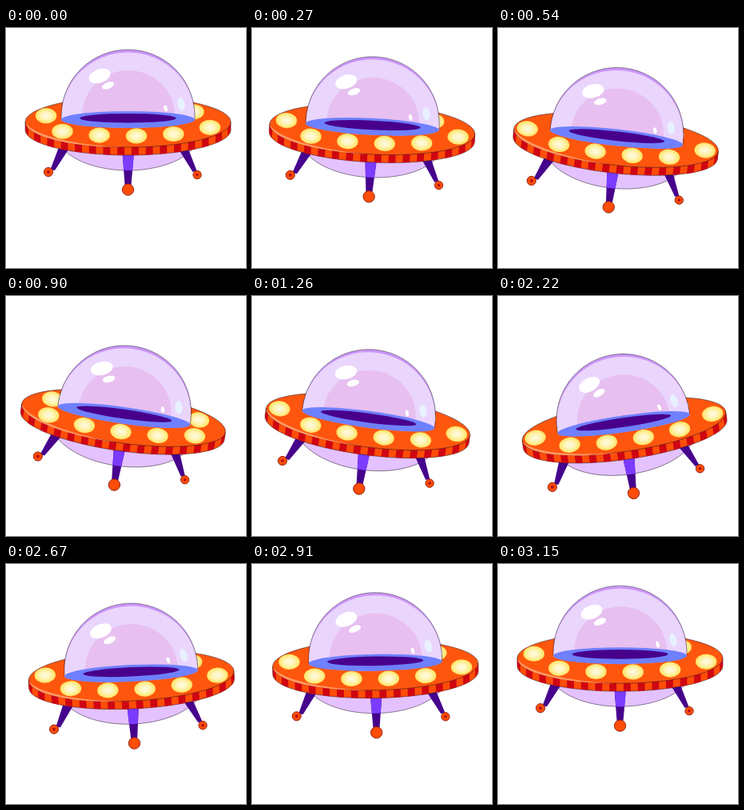
An HTML page for the animation above (3.18 s loop, 300x300 px).

```html
<!DOCTYPE html>
<html lang="en">
<head>
<meta charset="utf-8">
<title>Flying saucer</title>
<style>
  html, body { margin: 0; width: 100%; height: 100%; overflow: hidden; background: #fff; }
  svg { display: block; width: 100vw; height: 100vh; }
  .edge { stroke: #1c1024; stroke-width: .7; stroke-opacity: .7; }
  .foot { fill: #ff4d08; stroke: #8a1c10; stroke-width: .9; }
  .leg { fill: #46038c; }
</style>
</head>
<body>
<svg viewBox="0 0 300 300">
  <defs>
    <radialGradient id="glow">
      <stop offset="0" stop-color="#fffbe6"/>
      <stop offset=".55" stop-color="#fff3b0"/>
      <stop offset="1" stop-color="#ffe25e"/>
    </radialGradient>
    <clipPath id="domeClip"><path d="M69 114V110.5A83.5 83.5 0 0 1 236 110.5V114A83.5 10.5 0 0 1 69 114Z"/></clipPath>
    <path id="track" d="M152.5 135A112 18 0 0 0 264.5 117A112 18 0 0 0 40.5 117A112 18 0 0 0 152.5 135"/>
    <path id="rim" d="M24 117.5A128.5 31.5 0 0 0 281 117.5"/>
  </defs>

  <g id="ship">
    <ellipse class="edge" cx="152.5" cy="132" rx="89" ry="46" fill="#e4c2ff"/>

    <path class="leg" d="M66 149L78 152L61 178L55.5 177Z"/>
    <path class="leg" d="M216 152L227 149L238.5 178.5L233.5 180Z"/>
    <path class="leg" d="M145.5 156H160L156.5 196H148.5Z"/>
    <path fill="#7b3cff" d="M145.5 156H160L158 178H147.3Z"/>
    <circle class="foot" cx="53" cy="180" r="5.6"/>
    <circle class="foot" cx="239" cy="183.5" r="5.2"/>
    <circle class="foot" cx="152.5" cy="202" r="7.2"/>
    <circle cx="53" cy="180" r="2" fill="#b80f1c"/>
    <circle cx="239" cy="183.5" r="1.8" fill="#b80f1c"/>

    <path class="edge" fill="#ff4d08" d="M24 117.5V127.5A128.5 31.5 0 0 0 281 127.5V117.5Z"/>
    <path id="stripes" fill="#cf0612"/>
    <ellipse class="edge" cx="152.5" cy="117.5" rx="128.5" ry="31.5" fill="#ff560e"/>
    <path fill="#ff9a66" d="M24.5 119C28 136 82 149 146 149C90 147 36 135 24.5 119Z"/>
    <g id="lights" fill="url(#glow)"></g>

    <g clip-path="url(#domeClip)">
      <path fill="#cc96fb" d="M69 126V110.5A83.5 83.5 0 0 1 236 110.5V126Z"/>
      <ellipse cx="152.5" cy="112" rx="83.5" ry="81.5" fill="#ead5fd"/>
      <ellipse cx="153" cy="110" rx="58" ry="57" fill="#e7bff0"/>
    </g>
    <path class="edge" fill="none" d="M69 114V110.5A83.5 83.5 0 0 1 236 110.5V114"/>
    <ellipse cx="152.5" cy="114.5" rx="83.5" ry="10.5" fill="#6f80ff"/>
    <ellipse cx="152.5" cy="112.7" rx="60" ry="5.8" fill="#48008c"/>

    <g fill="#fff">
      <ellipse rx="14" ry="8.5" transform="translate(117 60) rotate(-20)"/>
      <ellipse rx="8" ry="4" transform="translate(127.5 72) rotate(-22)"/>
      <ellipse rx="2.1" ry="4" transform="translate(199.5 100.5) rotate(-15)"/>
      <ellipse rx="4.5" ry="8.3" transform="translate(219 95) rotate(-12)" fill="#e8f1ff"/>
    </g>
  </g>
</svg>

<script>
  const STEP = 30, STEPS = 106, LIGHTS = 10, STEPS_PER_GAP = 8;
  const byId = id => document.getElementById(id);
  const ship = byId('ship'), track = byId('track'), rim = byId('rim');

  // time, x shift, y shift, tilt in degrees
  const poses = [
    [0, 0, 0, 0],
    [540, -4.8, 22.4, 6.4],
    [1080, -5.9, 38.5, 8.2],
    [1260, -7.5, 39.7, 7.6],
    [1530, -8.6, 43.2, 1],
    [1620, -8, 44.8, -2.2],
    [1740, -5.9, 46.4, -5.7],
    [1950, 0, 47.4, -8.4],
    [2220, 5, 45.3, -8.2],
    [2400, 5.8, 38, -6.3],
    [2670, 4.1, 22.1, -2.6],
    [3180, 0, 0, 0]
  ];

  const rate = (i, c) => (poses[i + 1][c] - poses[i][c]) / (poses[i + 1][0] - poses[i][0]);

  // Harmonic mean of both sides; flat at turning points and at the ends
  function slope(i, c) {
    if (i === 0 || i === poses.length - 1) return 0;
    const a = rate(i - 1, c), b = rate(i, c);
    return a * b <= 0 ? 0 : 2 * a * b / (a + b);
  }

  function valueAt(t, c) {
    let i = 0;
    while (t >= poses[i + 1][0]) i++;
    const [p, q] = [poses[i], poses[i + 1]];
    const h = q[0] - p[0], u = (t - p[0]) / h, v = 1 - u;
    return v * v * (1 + 2 * u) * p[c] + u * u * (3 - 2 * u) * q[c]
      + h * u * v * (v * slope(i, c) - u * slope(i + 1, c));
  }

  // Vertical bars along the front of the rim
  const bar = rim.getTotalLength() / 31;
  let d = '';
  for (let i = 0; i < 31; i += 2) {
    const a = rim.getPointAtLength(i * bar), b = rim.getPointAtLength((i + 1) * bar);
    d += `M${a.x} ${a.y}v10L${b.x} ${b.y + 10}v-10Z`;
  }
  byId('stripes').setAttribute('d', d);

  const lights = Array.from({ length: LIGHTS }, () => {
    const e = document.createElementNS('http://www.w3.org/2000/svg', 'ellipse');
    e.setAttribute('rx', 13.2);
    e.setAttribute('ry', 9.6);
    return byId('lights').appendChild(e);
  });
  const total = track.getTotalLength(), gap = total / LIGHTS;

  function draw(step) {
    const [x, y, tilt] = [1, 2, 3].map(c => valueAt(step * STEP, c));
    ship.setAttribute('transform', `translate(${x} ${y}) rotate(${tilt} 152.5 117.5)`);
    lights.forEach((e, i) => {
      const p = track.getPointAtLength((10.5 + gap * (i + step / STEPS_PER_GAP)) % total);
      e.setAttribute('cx', p.x);
      e.setAttribute('cy', p.y);
    });
  }

  const start = performance.now();
  function tick() {
    draw(Math.floor((performance.now() - start) / STEP) % STEPS);
    requestAnimationFrame(tick);
  }
  tick();
</script>
</body>
</html>
```
